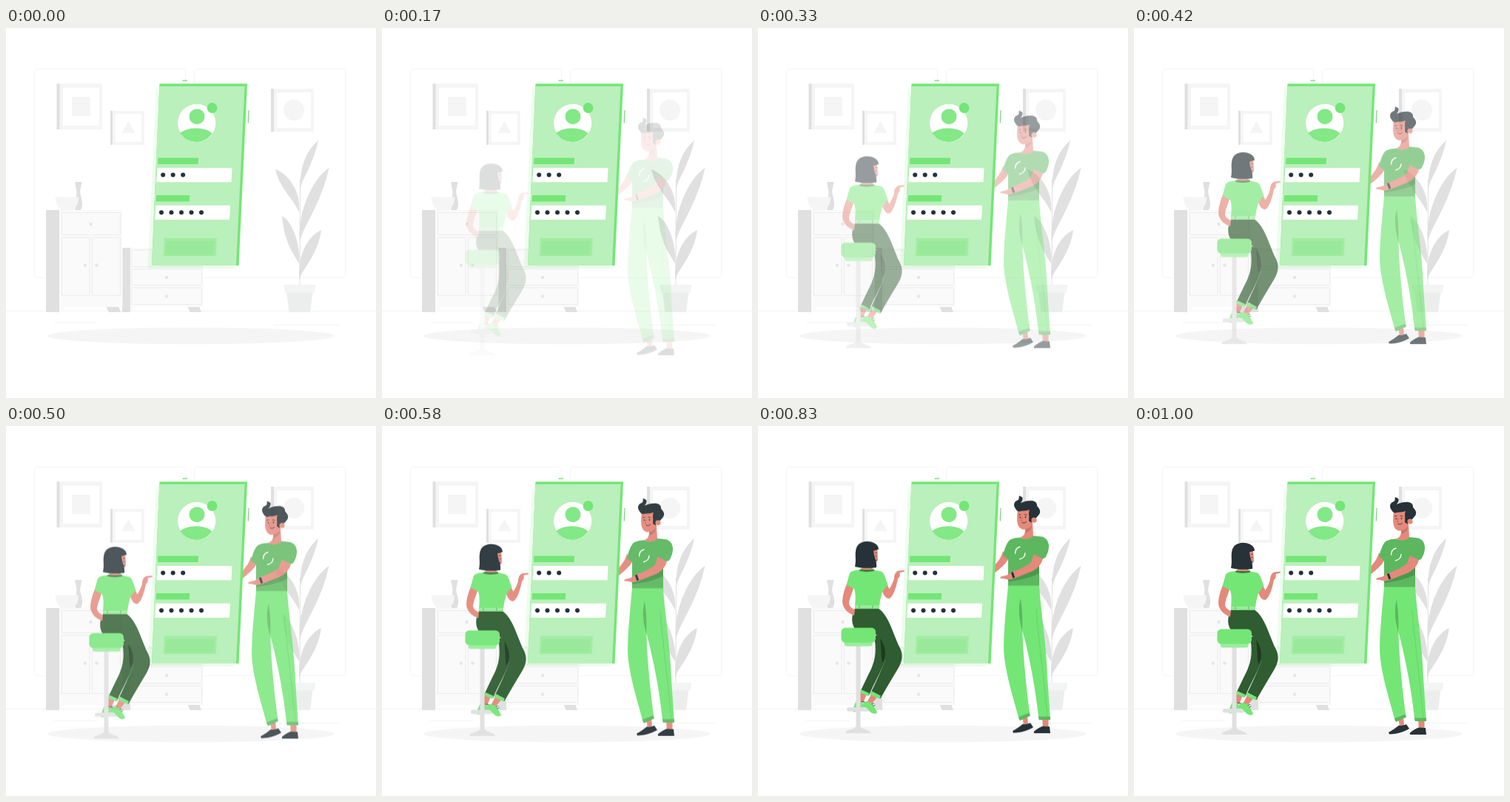
An HTML page for the animation above (1040 ms loop, 500 px wide and 500 px high).

```html
<!DOCTYPE html>
<html lang="en">
<head>
<meta charset="utf-8">
<title>Sign-in illustration</title>
<style>
  html, body { margin: 0; width: 100%; height: 100%; overflow: hidden; background: #fff; }
  svg { display: block; width: 100vw; height: 100vh; }
  .green { fill: #74e676; }
  .shirt { fill: #5cb75f; }
  .skin { fill: #e4897b; }
  .ink { fill: #263238; }
  .slacks { fill: #2f5c30; }
  .pale { fill: #f5f5f5; }
  .wall { fill: #e0e0e0; }
  .white { fill: #fff; }
  .edge { fill: #fafafa; stroke: #e9e9e9; stroke-width: .8; }
  .thin { fill: none; stroke: #263238; stroke-width: .8; stroke-linecap: round; }
  .person { opacity: 0; }
</style>
</head>
<body>
<svg viewBox="0 0 500 500">
  <!-- room -->
  <g fill="#fff" stroke="#f3f3f3" stroke-width=".8">
    <rect x="38.5" y="55.5" width="204" height="282" rx="4"/>
    <rect x="254.5" y="55.5" width="204" height="282" rx="4"/>
    <path d="M0 382.5H500M65 398H123M361 401.500H450" stroke="#f0f0f0"/>
  </g>
  <g>
    <path class="pale" d="M72 75H130V137H72Z"/><path class="wall" d="M68.500 75H72.500V137H68.500Z"/>
    <path class="white" d="M77 80.500H126V132H77Z"/><path class="pale" d="M89 93H114V119H89Z"/>
    <path class="pale" d="M144 112H187V158H144Z"/><path class="wall" d="M141 112H144V158H141Z"/>
    <path class="white" d="M147.500 116H183V154H147.500Z"/><path class="pale" d="M156 142L165.500 125.500L174.500 142Z"/>
    <path class="pale" d="M362 82H416V140H362Z"/><path class="wall" d="M358 82H362V140H358Z"/>
    <path class="white" d="M366 87H412V135H366Z"/><circle class="pale" cx="389" cy="111" r="14"/>
  </g>
  <g>
    <path class="wall" d="M157 297H168V384H157ZM245 376H261L264 384H249Z"/>
    <path fill="#fafafa" d="M168 297H267V377H173L171 384H168Z"/>
    <path class="edge" d="M170 300H264.500V322.500H170ZM170 326H264.500V347.500H170ZM170 351H264.500V373.500H170Z"/>
    <path class="wall" d="M54 246H72V384H54ZM135 376H152L155 384H139Z"/>
    <path fill="#fafafa" d="M72 246H157.500V377H78L76 384H72Z"/>
    <path class="edge" d="M75.500 249.500H154.500V279.500H75.500ZM75.500 283H113V361.500H75.500ZM116.500 283H154.500V361.500H116.500Z"/>
    <g fill="#e6e6e6">
      <circle cx="114.500" cy="265" r="2.200"/><circle cx="107" cy="320.500" r="2.200"/><circle cx="122.500" cy="320.500" r="2.200"/>
      <circle cx="217" cy="337" r="2.200"/><circle cx="217" cy="362.500" r="2.200"/>
    </g>
    <path class="wall" d="M93 208H102.500L100 221C101 229 106 237 101 246H94C90 237 96 229 95.500 221Z"/>
    <path class="pale" d="M66.500 228.500H98C98 238 94 244 90 246.500H75C70 243 67 237 66.500 228.500Z"/>
  </g>
  <g>
    <path d="M397 348L397.500 205" stroke="#e0e0e0"/>
    <path class="wall" d="M422 152C408 163 396 186 398 217C400 203 414 188 422 152ZM364 191C381 197 399 220 396 249C388 230 370 217 364 191ZM436.500 189C418 200 393 245 397 289C401 268 426 238 436.500 189ZM373 254C386 261 398 290 396.500 319C385 300 376 287 373 254ZM426 273C410 280 393 305 396.500 340C400 325 421 309 426 273Z"/>
    <path fill="#eceeed" d="M379 356H414.500L411 384H382.500Z"/>
    <path fill="#f3f4f4" d="M375 347H418.500L417 357.500H377Z"/>
  </g>
  <ellipse class="pale" cx="249.500" cy="416" rx="194" ry="11.300"/>

  <g class="person">
    <!-- man -->
    <path class="skin" d="M331 171L339 180C336 187 329 193 318 202L319 191C325 184 329 179 331 171Z"/>
    <path class="skin" d="M357 394L364 393L365 405L359 406ZM384 396H392.500V410H385Z"/>
    <path class="ink" d="M344 414C350 411 355 407 358 404.500C362 406 365 404 368 403L372 409C365 413 358 416 345 416.500ZM373 414.500C377 411 381 409 384.500 407.500L394 408L395 417H373Z"/>
    <path class="green" d="M338 217H380C382 250 390 300 391 340L395 398.500H379.500C375 355 366 310 357.500 279C358 310 363 360 367.500 392L353 399C347 375 335 340 332.500 310C331 290 335 250 338 217Z"/>
    <path class="shirt" d="M355 235C351 248 353 264 357 278C358 262 357 249 355 235ZM352 395L366.500 389.500L368 393.500L354 400ZM379 394.500H395V399H380Z"/>
    <path d="M376 249C379 290 385 330 391 394" fill="none" stroke="#5cc960" stroke-width=".6"/>
    <path class="shirt" d="M354 152.500C348 153 342 154 339 157C335 162 333 169 331 176.500L338 182V217.500H380V183L388 180C393 172 393 167 393 163C392 154 386 151 380 151L371 150C367 155 360 155 354 152.500Z"/>
    <path fill="#4a994d" d="M338 210L345 208L380 190V201C368 207 354 210 338 212Z"/>
    <path d="M347.500 174.500C347.500 169.500 350 166 354.500 165M353 182C358 181 361 177.500 361 173" fill="none" stroke="#fff" stroke-width="1.300"/>
    <path class="skin" d="M372.500 175L385 181C383 189 378 194 371 198L346 208L338 209.500L332 208L327 207.500L328 205.500L336 203.500L343 199C352 196 363 191 369 186Z"/>
    <path d="M343.300 199.500L345.800 207" stroke="#263238" stroke-width="3"/>
    <path class="skin" d="M361 136L371 133L372 151C368 155.500 359 155 354 152.500C359 151 362 148 361 136Z"/>
    <path fill="#c87468" d="M361 141.500L370 136C370 141 366 145 361.500 146Z"/>
    <path class="skin" d="M351 114H369L371 134C367 142 357 144 353 138.500C349 133 350 124 351 114Z"/>
    <path class="ink" d="M353 96C352 99 354 101 350 102.500C346 104 344.500 109 348 113.500C349 116 351 117 353 117.500C357 116 362 117 367 115C365 120 367 123 366 130L369.500 132.500C371 129 372 126 376 126C378 123 382 121 381 116C380 112 377 111 377 109C377 104 372 102 366 103C361 103 357 105 354.500 106C358 103 358 99 357 98Z"/>
    <circle class="skin" cx="373" cy="129" r="3.600"/>
    <path class="thin" d="M352.500 122L355 121.500M360 121.500L363 122M357 132.500Q360 134 362.500 131.500"/>
    <path d="M357.500 125L355.500 130H357.500" fill="none" stroke="#b95f54" stroke-width=".7"/>
    <circle class="ink" cx="354.500" cy="125.300" r=".9"/><circle class="ink" cx="361.500" cy="125" r=".9"/>
  </g>

  <!-- phone -->
  <path class="green" opacity=".12" d="M203 82H320L309 325H191.500Z"/>
  <path class="green" d="M207.500 75.300H326L314.500 321H197Z"/>
  <path fill="#baf0bb" d="M207.300 78.800H322.500L311 321H197Z"/>
  <path d="M238.500 71H245" stroke="#86dc89" stroke-width="1.500"/>
  <path d="M328 111L327.300 128.500" stroke="#74d078" stroke-width="1.100"/>
  <circle class="white" cx="257.700" cy="128.300" r="25.600"/>
  <g fill="#83e886">
    <circle cx="258" cy="119.700" r="10.500"/>
    <path d="M235.500 142C241 137 249 135.500 257 135.500C266 135.500 274 138 278.500 142.500C272 151 266 153.500 257 153.900C248 153.500 241 150 235.500 142Z"/>
  </g>
  <circle class="green" cx="278.600" cy="108" r="6.900"/>
  <path class="green" d="M205.400 175.500H260L259.600 184H205ZM203 226H248.200L247.800 234.500H202.600Z"/>
  <path class="white" d="M204.500 189H305.500L304.500 208.300H203.500ZM202.300 239.700H303L302 259H201.300Z"/>
  <g class="ink">
    <circle cx="212.200" cy="198.500" r="3"/><circle cx="225.700" cy="198.500" r="3"/><circle cx="239.200" cy="198.500" r="3"/>
    <circle cx="210" cy="249.300" r="3"/><circle cx="223.500" cy="249.300" r="3"/><circle cx="237" cy="249.300" r="3"/><circle cx="250.500" cy="249.300" r="3"/><circle cx="264" cy="249.300" r="3"/>
  </g>
  <path fill="#a3eca4" stroke="#95e797" stroke-width=".6" d="M214.500 284.300H284.300L283.200 307.500H213.500Z"/>
  <path fill="#98ea9a" d="M216.500 288H281.500L280.700 306H215.500Z"/>

  <g class="person">
    <!-- woman on a stool -->
    <path class="skin" d="M139 361L147 364L142 376L135 373Z"/>
    <path class="green" d="M133.500 371.500C137 374 140 374 141 376L139 387L128.500 388.500C128 383 131 377 133.500 371.500Z"/>
    <path class="slacks" d="M156 284C161 302 159 316 153 330C147 342 142 353 138 361L150 366C156 350 168 332 174 312L166 286Z"/>
    <path class="green" d="M139.500 358L150.500 363L149 367L137.500 362Z"/>
    <path class="wall" d="M132.500 298H138.500V408C141 412 151 412 153 417H118C119 412 130 412 132.500 408Z"/>
    <rect class="wall" x="120" y="382" width="31" height="5.500" rx="2.500"/>
    <path class="skin" d="M153 364L161 368L153 379L147 376Z"/>
    <path class="green" d="M142 376L147 373.500C149 376 152 376 154 375C156 381 160 385 161 389C159 391.500 155 391 152 388.500L146 382L139 381.500Z"/>
    <path class="thin" d="M140 374L144 374.500M154 377.500L157 376.500M155.500 380L158 379"/>
    <path class="slacks" d="M131 248.500H163C177 258 183 284 191 300C197 311 195 320 189 330C181 343 173 357 165.500 370L152 363C160 347 166 334 172 318C172 307 169 296 164 288L158 282L131 276C125 267 127 256 131 248.500Z"/>
    <path fill="#1c3a1e" d="M165 289C167 299 166 309 168 322C174 314 173 300 165 289Z"/>
    <path class="green" d="M153.500 360L166 366.500L164 370.500L151.500 364.500Z"/>
    <path class="skin" d="M121 213C116 224 113 236 114.500 243C117 251 123 255 130 258L131 250C126 248 123 245 123 241C124 233 128 226 129.500 219Z"/>
    <path class="skin" d="M167 222C169 229 172 235 177 235C182 234 187 220 189 208C192 206 192 203 191.500 200L198 198.500L197.500 196.800L189 197.500C185 200 184 204 184 208C182 214 180 218 177.500 222L174 215Z"/>
    <path class="skin" d="M141 187H154L155 198H139Z"/>
    <path class="green" d="M137 196C129 197 125 198 123.500 202L119.500 216.500L130 222C133 231 131 240 131 248.500H164C164 239 167 231 168 226L175.500 216C172 208 171 199 165 198L157 196.500Z"/>
    <path d="M137.500 196.500Q147 198.500 157 196.500" fill="none" stroke="#3d7b40" stroke-width="2.800"/>
    <path fill="#99ec9b" d="M131.500 244H164V247.800H131.300Z"/>
    <path d="M137 244V248M155 244V248" stroke="#5cb75f"/>
    <path class="skin" d="M152 167H161L162 179C162 186 159 188 153 188Z"/>
    <path class="ink" d="M131 192C133 183 131 177 132 171C133 162 139 158 147 157.800C156 158 163 162 163 168.500L156 170.500C157 180 161 185 160 193C150 194.500 140 194 131 192Z"/>
    <path class="thin" d="M158.500 173.500L160.500 173M159.500 177V178M159 183.500L161 183"/>
    <rect fill="#9aed9c" x="117" y="289" width="37.500" height="10.500" rx="3"/>
    <rect class="green" x="112.500" y="274.500" width="46.500" height="20" rx="5.500"/>
  </g>
</svg>
<script>
  const LOOP = 1040, FPS = 24;
  const rises = [...document.querySelectorAll('.person')].map(el => {
    const rise = el.animate(
      [{ opacity: 0, transform: 'translateY(30px)' }, { opacity: 1, transform: 'translateY(0)' }],
      { duration: 1000, easing: 'cubic-bezier(.36, -.01, .5, 1.38)', fill: 'both' }
    );
    rise.pause();
    return rise;
  });

  // The rise advances in film steps after a short empty hold.
  function draw() {
    const step = Math.floor((performance.now() % LOOP) * FPS / 1000 + .1);
    const time = step < 2 ? 0 : Math.min(1000, (step + 1) * 1000 / FPS);
    for (const rise of rises) rise.currentTime = time;
    requestAnimationFrame(draw);
  }
  draw();
</script>
</body>
</html>
```
